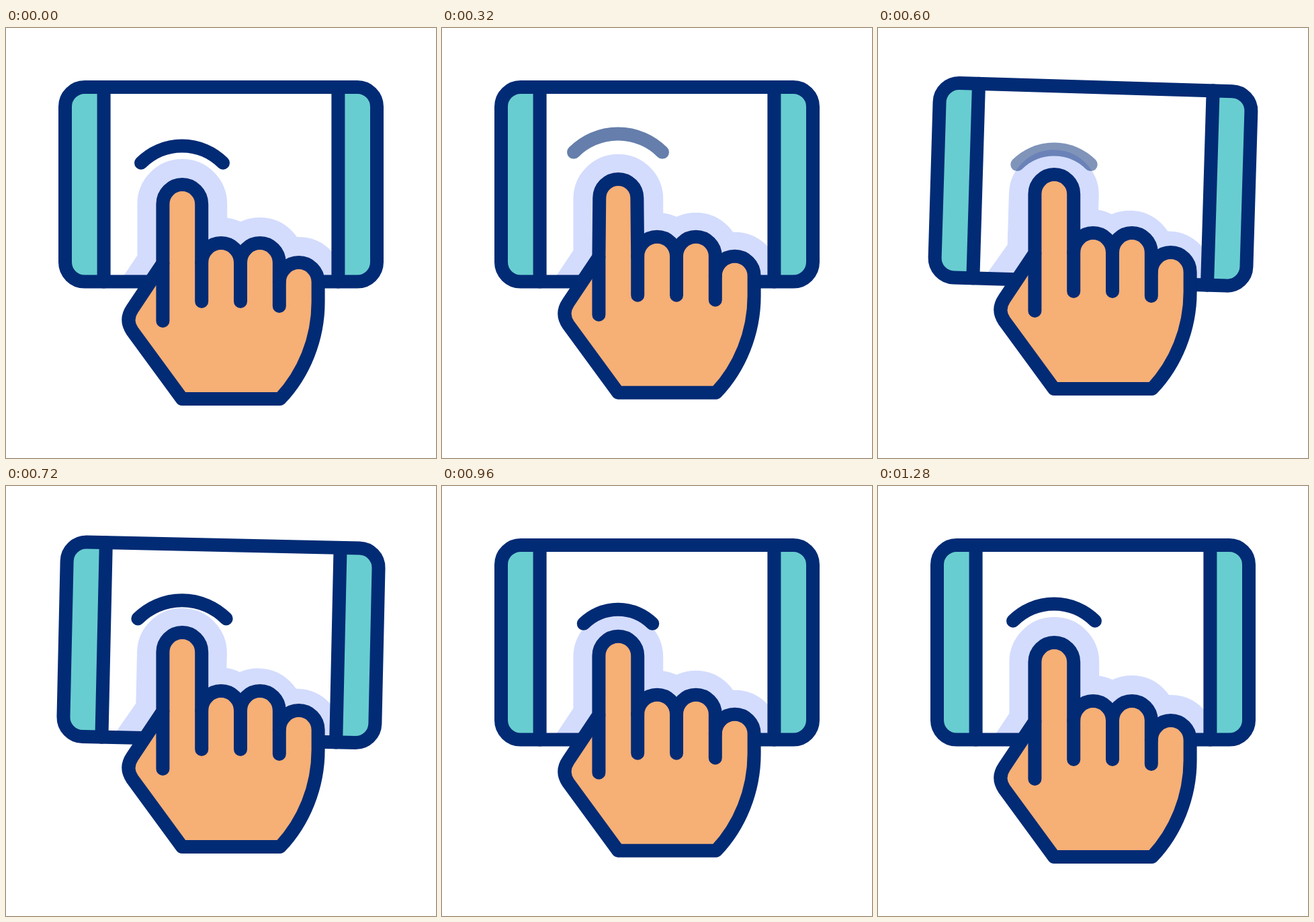
Recreate the animation shown at these times as an HTML page with a canvas. Size 640 by 640 pixels, loop 1320 ms.

```html
<!DOCTYPE html>
<html lang="en">
<head>
<meta charset="utf-8">
<title>Tap on phone</title>
<style>
  html, body { margin: 0; width: 100%; height: 100%; overflow: hidden; background: #fff; }
  canvas { display: block; width: 100vw; height: 100vh; object-fit: contain; }
</style>
</head>
<body>
<canvas id="stage" width="640" height="640"></canvas>
<script>
const ctx = document.getElementById('stage').getContext('2d');
const NAVY = '#022b75', TEAL = '#68cdd0', SKIN = '#f6af75', GLOW = '#d3dcfd';
const LOOP = 1320, STEP = 40;
const LINE = 20, GLOW_LINE = 76;
const FINGER = 57.8, R = FINGER / 2, X0 = 233.4;
const [X1, X2, X3, X4] = [1, 2, 3, 4].map(i => X0 + i * FINGER);
const TIP_Y = 262, KNUCKLE_Y = 349, PINKY_Y = 378;
const PHONE = { cx: 320, cy: 232.8 };

const smooth = p => p * p * (3 - 2 * p);

// Eased value from [time, value] keys, held at both ends.
function track(t, keys) {
  if (t <= keys[0][0]) return keys[0][1];
  for (let i = 1; i < keys.length; i++) {
    const [t0, a] = keys[i - 1], [t1, b] = keys[i];
    if (t < t1) return a + (b - a) * smooth((t - t0) / (t1 - t0));
  }
  return keys[keys.length - 1][1];
}

function pose(t) {
  const returning = t >= 500;
  return {
    lift: track(t, [[70, 0], [500, 1], [730, 1], [1280, 0]]),
    press: track(t, [[250, 0], [450, 1], [480, 1], [590, 0]]),
    tilt: track(t, [[440, 0], [660, 2.1], [800, 0]]) * Math.PI / 180,
    wave: returning ? {
      half: track(t, [[540, 52], [760, 67], [1000, 50], [1290, 61]]),
      top: track(t, [[540, 183], [760, 169], [1000, 184.8], [1290, 175.5]]),
      alpha: track(t, [[540, 0], [660, 1]])
    } : {
      half: track(t, [[70, 61], [500, 69]]),
      top: track(t, [[70, 175.5], [500, 146.5]]),
      alpha: track(t, [[230, 1], [440, 0]])
    }
  };
}

function stroke(path, width = LINE, color = NAVY) {
  ctx.lineWidth = width;
  ctx.strokeStyle = color;
  ctx.stroke(path);
}

function fill(path, color) {
  ctx.fillStyle = color;
  ctx.fill(path);
}

function handOutline(press) {
  const p = new Path2D();
  const r = R - 3 * press, cx = (X0 + X1) / 2, tipY = TIP_Y + 1 * press;
  p.moveTo(X0, 350);
  p.lineTo(cx - r, tipY);
  p.arc(cx, tipY, r, Math.PI, 0);
  p.lineTo(X1, KNUCKLE_Y);
  p.arc(X1 + R, KNUCKLE_Y, R, Math.PI, 0);
  p.arc(X2 + R, KNUCKLE_Y, R, Math.PI, 0);
  p.lineTo(X3, PINKY_Y);
  p.arc(X3 + R, PINKY_Y, R, Math.PI, 0);
  p.lineTo(X4, 408);
  p.bezierCurveTo(X4, 463, 443, 515, 408, 552);
  p.lineTo(262, 552);
  p.lineTo(188, 451);
  p.bezierCurveTo(180.5, 440, 180.5, 429, 188, 418);
  p.closePath();
  return p;
}

function fingerGaps() {
  const p = new Path2D();
  for (const [x, top, end] of [[X0, 350, 436], [X1, KNUCKLE_Y, 407], [X2, KNUCKLE_Y, 407], [X3, PINKY_Y, 414]]) {
    p.moveTo(x, top);
    p.lineTo(x, end);
  }
  return p;
}

const restingHand = handOutline(0);
const gaps = fingerGaps();
const body = new Path2D();
body.roundRect(88, 88, 464, 289.6, 29);
const screen = new Path2D();
screen.rect(145.6, 88, 348.8, 289.6);
const dividers = new Path2D('M145.6 88V377.6M494.4 88V377.6');

function drawPhone({ tilt, lift }) {
  ctx.save();
  ctx.translate(PHONE.cx, PHONE.cy);
  ctx.rotate(tilt);
  ctx.translate(-PHONE.cx, -PHONE.cy);
  fill(body, TEAL);
  fill(screen, '#fff');

  ctx.save();
  ctx.clip(screen);
  ctx.translate(0, -12 * lift);
  fill(restingHand, GLOW);
  stroke(restingHand, GLOW_LINE, GLOW);
  ctx.restore();

  stroke(body);
  stroke(dividers);
  ctx.restore();
}

function drawWave({ half, top, alpha }) {
  if (alpha <= 0) return;
  const radius = half / Math.sin(Math.PI / 4);
  const arc = new Path2D();
  arc.arc(262, top + radius, radius, -Math.PI * 3 / 4, -Math.PI / 4);
  ctx.globalAlpha = alpha;
  stroke(arc);
  ctx.globalAlpha = 1;
}

function drawHand({ lift, press }) {
  const outline = handOutline(press);
  ctx.save();
  ctx.translate(0, -15 * lift);
  fill(outline, SKIN);
  stroke(outline);
  stroke(gaps);
  ctx.restore();
}

function render(now) {
  const t = Math.floor((now % LOOP) / STEP) * STEP;
  const state = pose(t);
  ctx.fillStyle = '#fff';
  ctx.fillRect(0, 0, 640, 640);
  ctx.lineCap = ctx.lineJoin = 'round';
  drawPhone(state);
  drawWave(state.wave);
  drawHand(state);
}

let start;
function tick(now) {
  start ??= now;
  render(now - start);
  requestAnimationFrame(tick);
}
render(0);
requestAnimationFrame(tick);
</script>
</body>
</html>
```
